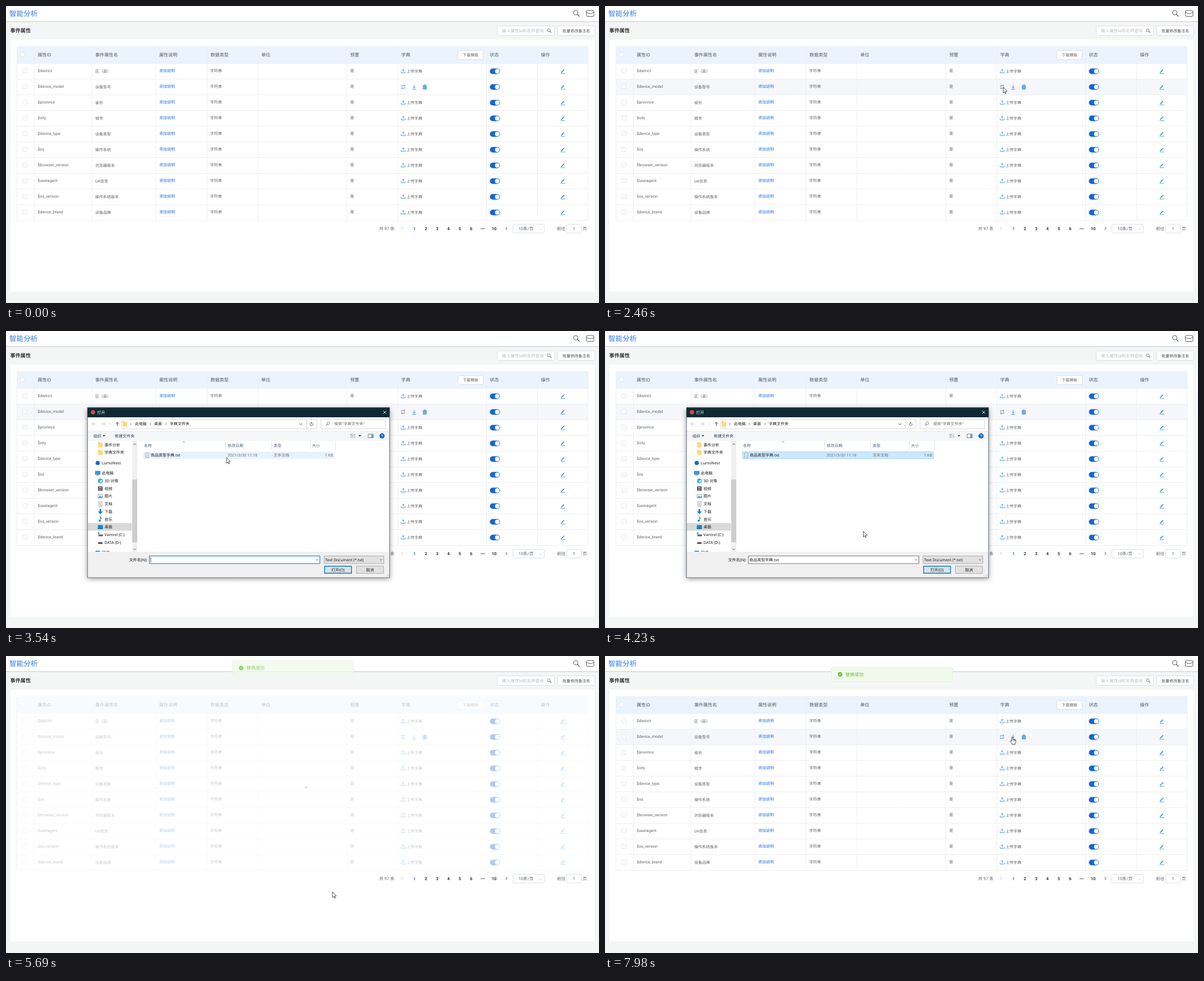
These frames come from a looping animation (1057x530 px, 8000 ms). An HTML page with a canvas:

```html
<!DOCTYPE html>
<html lang="zh-CN">
<head>
<meta charset="utf-8">
<title>事件属性</title>
<style>
html, body { margin: 0; width: 100%; height: 100%; overflow: hidden; background: #f4f6f6; }
canvas { display: block; }
</style>
</head>
<body>
<canvas id="stage" width="1057" height="530"></canvas>
<script>
const ctx = document.getElementById('stage').getContext('2d');
const LOOP = 8000, OPEN = 2700, CLICK = 1910, PICK = 3720, PRESS = 5100, CLOSE = 5380, DONE = 5560, RELOADED = 5760;
const CJK = '"Noto Sans CJK SC", "Noto Sans CJK", sans-serif';
const WEB = 'Roboto, ' + CJK, SYS = '"Noto Sans", ' + CJK;
const BLUE = '#3a8ee6', LINE = '#ebeef5', EDGE = '#dcdfe6', TEXT = '#606266';

// ---------- helpers ----------
const clamp = v => Math.max(0, Math.min(1, v));

// CSS "ease" timing: cubic-bezier(.25, .1, .25, 1)
function ease(p) {
  p = clamp(p);
  let lo = 0, hi = 1, s = p;
  for (let i = 0; i < 18; i++) {
    s = (lo + hi) / 2;
    const x = .75 * s * (1 - s) * (1 - s) + .75 * s * s * (1 - s) + s ** 3;
    if (x < p) lo = s; else hi = s;
  }
  return .3 * s * (1 - s) * (1 - s) + 3 * s * s * (1 - s) + s ** 3;
}

function text(s, x, y, size, color = TEXT, { font = WEB, weight = 400, align = 'left' } = {}) {
  ctx.font = `${weight} ${size}px ${font}`;
  ctx.textAlign = align;
  ctx.fillStyle = color;
  ctx.fillText(s, x, y + size * .37);
}
const sys = (s, x, y, color = '#1a1a1a', align = 'left') => text(s, x, y, 7, color, { font: SYS, align });

function rect(x, y, w, h, fill, stroke, r = 0, lw = 1) {
  ctx.beginPath();
  ctx.roundRect(x, y, w, h, r);
  if (fill) { ctx.fillStyle = fill; ctx.fill(); }
  if (stroke) { ctx.strokeStyle = stroke; ctx.lineWidth = lw; ctx.stroke(); }
}

function dot(x, y, r, fill, stroke, lw = 1) {
  ctx.beginPath();
  ctx.arc(x, y, r, 0, Math.PI * 2);
  if (fill) { ctx.fillStyle = fill; ctx.fill(); }
  if (stroke) { ctx.strokeStyle = stroke; ctx.lineWidth = lw; ctx.stroke(); }
}

function trace(pts) {
  ctx.beginPath();
  for (let i = 0; i < pts.length; i += 2) ctx.lineTo(pts[i], pts[i + 1]);
}
function line(color, w, ...pts) {
  trace(pts);
  ctx.strokeStyle = color;
  ctx.lineWidth = w;
  ctx.stroke();
}
function shape(color, ...pts) {
  trace(pts);
  ctx.fillStyle = color;
  ctx.fill();
}
const chevron = (x, y, color, s = 2, w = .8) => line(color, w, x - s, y - s / 2, x, y + s / 2, x + s, y - s / 2);

function lens(x, y, r, color, w, dir = 1) {
  dot(x, y, r, null, color, w);
  line(color, w * 1.3, x + dir * r * .7, y + r * .7, x + dir * r * 1.7, y + r * 1.7);
}

// ---------- pointer ----------
const PATH = [
  [80, 1015, 532], [400, 1005, 470], [680, 860, 400], [880, 745, 177], [1120, 712, 146],
  [1300, 706, 134], [1500, 708, 139], [2120, 708, 139], [2330, 710, 145], [3170, 710, 145],
  [3520, 400, 226], [3700, 363, 221], [4030, 363, 221], [4230, 460, 357], [4480, 578, 428],
  [4640, 582, 432], [4960, 582, 432], [5080, 582, 421], [6860, 582, 421], [7200, 640, 395],
  [7450, 715, 260], [7650, 729, 165], [7980, 726, 144]
];

function slope(i, k) {
  if (!i || i === PATH.length - 1) return 0;
  const [a, b, c] = PATH.slice(i - 1, i + 2);
  const d0 = (b[k] - a[k]) / (b[0] - a[0]), d1 = (c[k] - b[k]) / (c[0] - b[0]);
  return d0 * d1 <= 0 ? 0 : 2 * d0 * d1 / (d0 + d1);
}

// monotone cubic through the path points
function pointer(t) {
  const i = PATH.findIndex(p => p[0] > t) - 1;
  if (i < 0) return (t < PATH[0][0] ? PATH[0] : PATH[PATH.length - 1]).slice(1);
  const a = PATH[i], b = PATH[i + 1], dt = b[0] - a[0], u = (t - a[0]) / dt, v = 1 - u;
  return [1, 2].map(k =>
    (1 + 2 * u) * v * v * a[k] + u * v * v * dt * slope(i, k) +
    u * u * (3 - 2 * u) * b[k] - u * u * v * dt * slope(i + 1, k));
}

function hoveredRow(t) {
  if (t < 80) return -1;
  if (t >= OPEN && t < CLOSE) return 1;
  const [x, y] = pointer(t);
  return x > 20 && x < 1037 ? Math.floor((y - 102) / 28) : -1;
}

function drawPointer(t) {
  if (t < 80) return;
  const [x, y] = pointer(t);
  const hand = (t > 1250 && t < CLICK) || t > 7840;
  ctx.save();
  ctx.translate(x, y);
  ctx.lineJoin = 'round';
  ctx.beginPath();
  if (hand) {
    ctx.moveTo(-1, 8);
    ctx.lineTo(-1, 1);
    ctx.quadraticCurveTo(.1, -.8, 1.2, 1);
    ctx.lineTo(1.2, 5);
    ctx.quadraticCurveTo(2.5, 4, 3.2, 5.4);
    ctx.quadraticCurveTo(4.5, 4.6, 5, 6);
    ctx.quadraticCurveTo(6.4, 5.6, 6.4, 7.2);
    ctx.quadraticCurveTo(6.6, 10, 5, 12);
    ctx.lineTo(5, 13.6);
    ctx.lineTo(-.4, 13.6);
    ctx.lineTo(-.6, 12);
    ctx.lineTo(-3.8, 8);
    ctx.quadraticCurveTo(-3.2, 6.2, -1, 8);
  } else {
    for (const [px, py] of [[0, 0], [0, 10], [2.3, 8], [3.8, 11.4], [5.3, 10.7], [3.8, 7.4], [6.9, 7]]) ctx.lineTo(px, py);
  }
  ctx.closePath();
  ctx.fillStyle = '#fff';
  ctx.fill();
  ctx.strokeStyle = '#222';
  ctx.lineWidth = .8;
  ctx.stroke();
  if (hand) for (const fx of [1.2, 3.2, 5]) line('#222', .6, fx, 5.2, fx, 8);
  ctx.restore();
}

// ---------- page ----------
const COLS = [19.5, 50.5, 153, 267, 358.5, 449, 607.5, 698.5, 856.5, 947.5, 1037.5];
const HEADS = ['', '属性ID', '事件属性名', '属性说明', '数据类型', '单位', '预置', '字典', '状态', '操作'];
const ROWS = [
  ['$district', '区（县）'], ['$device_model', '设备型号'], ['$province', '省份'], ['$city', '城市'],
  ['$device_type', '设备类型'], ['$os', '操作系统'], ['$browser_version', '浏览器版本'],
  ['$useragent', 'UA信息'], ['$os_version', '操作系统版本'], ['$device_brand', '设备品牌']
];

function drawFrame() {
  rect(0, 0, 1057, 530, '#f4f6f6');
  rect(0, 28, 1057, 1, '#e6e8e8');
  rect(0, 0, 1057, 27, '#fff');
  rect(0, 27, 1057, 1, '#d6d8d8');
  text('智能分析', 6, 13, 12.6, '#6fa4e6', { weight: 700 });
  lens(1015.5, 12, 4, '#5c5c5c', 1);
  rect(1034.5, 8, 13.5, 10.5, null, '#5c5c5c', 2);
  ctx.beginPath();
  ctx.moveTo(1034.5, 11);
  ctx.quadraticCurveTo(1041.2, 16.5, 1048, 11);
  ctx.stroke();

  text('事件属性', 7.5, 43.5, 9.2, '#303133', { weight: 700 });
  rect(875.5, 35.5, 102, 17, '#fff', EDGE, 2);
  text('输入属性Id和名称查询', 884, 44, 7.6, '#b9bdc6');
  lens(967.5, 43.3, 2.6, TEXT, .8);
  rect(983.5, 35.5, 66, 17, '#fff', EDGE, 2);
  text('批量修改备注名', 1016.5, 44, 7, '#45484d', { align: 'center' });
  rect(8, 60, 1041, 449.5, '#fff');
}

function uploadIcon(x, y) {
  line(BLUE, .9, x - 3.6, y + .5, x - 3.6, y + 3, x + 3.6, y + 3, x + 3.6, y + .5);
  line(BLUE, .9, x, y + 1.2, x, y - 3.4);
  line(BLUE, .9, x - 2, y - 1.5, x, y - 3.6, x + 2, y - 1.5);
}

function dictIcons(y, busy) {
  const c = busy ? '#73767a' : BLUE;
  line(c, .9, 704.8, y - .6, 704.8, y - 2.4, 711, y - 2.4);
  line(c, .9, 709.4, y - 4, 711, y - 2.4, 709.4, y - .9);
  line(c, .9, 711, y + .4, 711, y + 2.2, 704.8, y + 2.2);
  line(c, .9, 706.4, y + .7, 704.8, y + 2.2, 706.4, y + 3.7);
  line(BLUE, .9, 727.5, y - 3.8, 727.5, y + 1.8);
  line(BLUE, .9, 725, y - .5, 727.5, y + 2, 730, y - .5);
  line(BLUE, 1, 723.8, y + 3.9, 731.2, y + 3.9);
  rect(743.6, y - 1.8, 5.8, 5.8, '#7db4ee', BLUE, .5, .9);
  line(BLUE, .9, 742.8, y - 2.5, 750.2, y - 2.5);
  line(BLUE, .9, 744.8, y - 3.8, 748.2, y - 3.8);
  line(BLUE, .7, 746.5, y - 1, 746.5, y + 3);
}

function drawTable(t) {
  rect(19.5, 72.5, 1018, 30, '#ebf4fd');
  const recent = Array.from({ length: 12 }, (_, k) => hoveredRow(t - k * 20));
  ROWS.forEach((row, i) => {
    const y = 102.5 + i * 28, mid = y + 13.5;
    const level = recent.filter(r => r === i).length / 12;
    if (level) rect(19.5, y, 1018, 28, `rgba(245,247,250,${level})`);
    line(LINE, 1, 19.5, y, 1037.5, y);
    rect(30, mid - 4, 7.5, 7.5, '#fff', EDGE, 1, .8);
    text(row[0], 56.5, mid - .5, 7);
    text(row[1], 159, mid + .5, 7);
    text('添加说明', 273, mid - .5, 7, '#1c6ddb');
    text('字符串', 364, mid - .5, 7);
    text('是', 613.5, mid - .5, 7);
    if (i === 1) dictIcons(mid + .5, t >= CLICK && t < DONE);
    else {
      uploadIcon(708, mid + .3);
      text('上传字典', 714, mid + .5, 7);
    }
    rect(862.5, mid - 4.5, 18, 10, '#1566d6', null, 5);
    dot(875.6, mid + .5, 4, '#fff');
    line(BLUE, 1.8, 990.5, mid + 2, 994.8, mid - 2.5);
    shape(BLUE, 989, mid + 3.5, 989.6, mid + 1.2, 991.4, mid + 2.8);
    line(BLUE, .8, 988.6, mid + 4.5, 996.8, mid + 4.5);
  });
  rect(19.5, 72.5, 1018, 310, null, LINE);
  for (const x of COLS.slice(1, -1)) line(LINE, 1, x, 72.5, x, 382.5);
  rect(25.5, 83, 7.5, 7.5, '#fff', EDGE, 1, .8);
  HEADS.forEach((h, i) => text(h, COLS[i] + 6, 87, 8.1, '#55585e'));
  rect(805.5, 79.5, 45, 16, '#fff', EDGE, 1.5);
  text('下载模板', 828, 87.5, 7, TEXT, { align: 'center' });
}

function drawPager() {
  const y = 397, mid = { align: 'center' }, bold = { align: 'center', weight: 700 };
  text('共 97 条', 665, y, 7.6);
  line('#b4b8c0', .9, 707, y - 2.5, 704.6, y, 707, y + 2.5);
  [1, 2, 3, 4, 5, 6].forEach(n => text(n, 708 + n * 20.2, y, 7.6, n === 1 ? '#2a6fdb' : '#303133', bold));
  for (const x of [847, 849.6, 852.2]) dot(x, y + .3, .85, '#303133');
  text('10', 870, y, 7.6, '#303133', bold);
  line('#303133', .9, 890.8, y - 2.5, 893.2, y, 890.8, y + 2.5);
  rect(903.5, 389.5, 56, 15.5, '#fff', EDGE, 2);
  text('10条/页', 927, y + .5, 7.6, TEXT, mid);
  chevron(953, y + 1, '#c0c4cc');
  text('前往', 982, y + .5, 7.6);
  rect(999.5, 389.5, 26, 15.5, '#fff', EDGE, 2);
  text('1', 1012.5, y + .5, 7.6, TEXT, mid);
  text('页', 1028, y + .5, 7.6);
}

function drawLoading(t) {
  if (t < DONE || t > RELOADED + 300) return;
  const shown = ease((Math.min(t, RELOADED) - DONE) / 300) * (1 - ease((t - RELOADED) / 300));
  ctx.globalAlpha = shown;
  rect(20, 72, 1018, 311, 'rgba(255,255,255,.9)');
  const a = .72 + (t - 5690) / 2000 * Math.PI * 2;
  ctx.beginPath();
  ctx.arc(528.5, 227, 9.8, a, a + .28 + clamp((t - 5690) / 600) * 1.5);
  ctx.strokeStyle = '#5b7488';
  ctx.lineWidth = 1.2;
  ctx.stroke();
  ctx.globalAlpha = 1;
}

function drawMessage(t) {
  if (t < DONE) return;
  ctx.save();
  ctx.globalAlpha = ease((t - DONE) / 300);
  ctx.translate(0, -26 * (1 - ease((t - DONE) / 400)));
  rect(403.5, 20, 216, 26, '#f0f9eb', '#e1f3d8', 2);
  dot(419, 32.8, 4, '#67c23a');
  line('#fff', .9, 417.2, 32.8, 418.6, 34.2, 421, 31.5);
  text('替换成功', 428.5, 32.8, 8.1, '#67c23a');
  ctx.restore();
}

// ---------- file dialog ----------
const folder = (x, y) => { rect(x - 4, y - 4.5, 4, 3, '#e8b84a'); rect(x - 4, y - 3.5, 8, 8, '#ffd97a'); };
const page = (x, y) => {
  rect(x - 3, y - 4.2, 6, 8.4, '#fff', '#8a8f94', 0, .7);
  for (let k = -2; k < 4; k += 1.6) line('#7fa3bd', .6, x - 1.8, y + k, x + 1.8, y + k);
};
const screen = (x, y) => { rect(x - 4.5, y - 3.5, 9, 6, '#2f9be6', '#5b7890', 0, .6); rect(x - 2.5, y + 3.2, 5, 1, '#5b7890'); };
const disk = (x, y) => { rect(x - 4, y, 8, 3, '#55595c'); rect(x - 3.4, y - .8, 6.8, 1, '#b8bcc0'); };
const NAV = [
  ['事件分析', 203, 1, folder],
  ['字典文件夹', 216.8, 1, folder],
  ['LumoNest', 235, 0, (x, y) => dot(x, y, 3.8, '#0a6fc2')],
  ['此电脑', 253, 0, screen],
  ['3D 对象', 267, 1, (x, y) => { shape('#27a5d8', x - 4, y - 2.5, x, y - 4.5, x + 4, y - 2.5, x + 4, y + 2.5, x, y + 4.5, x - 4, y + 2.5); shape('#b8e6f5', x - 1, y - 1, x + 3, y - 2, x + 3, y + 2, x - 1, y + 3); }],
  ['视频', 280.7, 1, (x, y) => { rect(x - 4, y - 4, 8, 8, '#454a50'); rect(x - 2.4, y - 3, 4.8, 2.6, '#7ab2dd'); rect(x - 2.4, y + .6, 4.8, 2.6, '#b58a5c'); }],
  ['图片', 294.4, 1, (x, y) => { rect(x - 4.2, y - 3.2, 8.4, 6.4, '#eaf5fc', '#7d8e9a', 0, .7); shape('#3b8fc9', x - 3.5, y + 2.5, x - .8, y - 1, x + 1, y + 1, x + 3.5, y, x + 3.5, y + 2.5); }],
  ['文档', 308, 1, page],
  ['下载', 321.8, 1, (x, y) => shape('#1b83d6', x - 1.6, y - 4.5, x + 1.6, y - 4.5, x + 1.6, y, x + 4.4, y, x, y + 4.6, x - 4.4, y, x - 1.6, y)],
  ['音乐', 335.5, 1, (x, y) => { dot(x - 1.3, y + 2.6, 1.8, '#1b83d6'); line('#1b83d6', 1.1, x, y + 2.5, x, y - 4, x + 2.6, y - 1); }],
  ['桌面', 349.2, 1, (x, y) => { rect(x - 4.5, y - 3.5, 9, 7, '#1487dc'); rect(x - 4.5, y + 2, 9, 1.5, '#0b5c9c'); }],
  ['Vantrel (C:)', 362.8, 1, (x, y) => { disk(x + .5, y); rect(x - 4.5, y - 3.8, 3, 3, '#27a5e0'); }],
  ['DATA (D:)', 376.5, 1, disk],
  ['网络', 394.5, 0, (x, y) => { rect(x - 4, y - 3, 8, 5, '#3b9be0'); dot(x + 3, y + 1, 2, '#55788f'); }]
];

function drawNav(shift) {
  ctx.save();
  ctx.beginPath();
  ctx.rect(146, 196, 89, 198);
  ctx.clip();
  rect(146, 342.3 + shift, 78.5, 13.4, '#d9d9d9');
  NAV.forEach(([label, y, depth, icon], i) => {
    const dy = y + (i > 1 ? shift : 0);
    icon(163.5 + depth * 4.7, dy);
    sys(label, 170.8 + depth * 4.8, dy);
  });
  rect(225, 196, 9, 198, '#f0f0f0');
  rect(225, 265, 9, 112, '#cdcdcd');
  line('#505050', 1, 227.3, 203, 229.5, 200.8, 231.7, 203);
  line('#505050', 1, 227.3, 388.3, 229.5, 390.5, 231.7, 388.3);
  ctx.restore();
}

function drawFiles(t, ready, pressed, shift) {
  const head = '#4c607a', gray = '#6d6d6d', y = 221.2 + shift;
  [['名称', 246], ['修改日期', 395], ['类型', 477], ['大小', 545.5]].forEach(([s, x]) => sys(s, x, 204.3, head));
  for (const x of [391.5, 473.5, 542.5, 587.5]) line('#e5e5e5', 1, x, 197, x, 212);
  line('#6d6d6d', .8, 315, 198.8, 317.2, 196.8, 319.4, 198.8);
  const [px, py] = pointer(t);
  const over = px > 245 && px < 586 && py > 215 && py < 228;
  if (pressed) rect(244.5, 215.5, 341, 12.5, '#d9d9d9');
  else if (t >= PICK) rect(245, 215.5, 340.5, 12.5, '#cce8ff', '#99d1ff', 0, .8);
  else if (over) rect(244.5, 215.5, 341, 12.5, '#e5f3ff');
  page(251.5, y);
  sys('商品类型字典.txt', 258, y);
  sys('2021/3/30 11:18', 395, y, gray);
  sys('文本文档', 477, y, gray);
  sys('1 KB', 583, y, gray, 'right');
}

function drawFooter(t, pressed) {
  rect(145.5, 394, 538, 46, '#f0f0f0');
  sys('文件名(N):', 252, 408, '#1a1a1a', 'right');
  const picked = t >= PICK;
  rect(255.5, 401.5, 304, 13.5, '#fff', picked && !pressed ? '#7a7a7a' : '#0078d7');
  chevron(554.5, 408.3, '#444');
  if (pressed) rect(257, 403, 52, 10.5, '#0078d7');
  if (picked) sys('商品类型字典.txt', 257.3, 408.3, pressed ? '#fff' : '#1a1a1a');
  else line('#1a1a1a', .8, 258, 403.5, 258, 413);
  rect(567, 401.5, 106.5, 13.5, '#e1e1e1', '#adadad');
  text('Text Document (*.txt)', 569, 408, 6.85, '#1a1a1a', { font: SYS });
  chevron(668.5, 408.3, '#444');

  const [px, py] = pointer(t);
  const over = px > 567 && px < 616 && py > 419 && py < 433;
  if (pressed) rect(567.5, 419.5, 48.5, 13, '#cce4f7', '#005499');
  else rect(568, 419.8, 47.8, 12.4, over ? '#e5f1fb' : '#e1e1e1', '#0078d7', 0, over ? 1 : 1.4);
  sys('打开(O)', 591.8, 426, '#1a1a1a', 'center');
  rect(624.5, 419.5, 48.5, 13, '#e1e1e1', '#adadad');
  sys('取消', 648.8, 426, '#1a1a1a', 'center');
  for (const [x, y] of [[681.5, 437.5], [679, 437.5], [681.5, 435]]) rect(x - .6, y - .6, 1.2, 1.2, '#b0b0b0');
}

function drawAddress() {
  const faint = '#c4c4c4', dark = '#444';
  line(faint, 1, 160, 166, 153, 166);
  line(faint, 1, 155.8, 163, 153, 166, 155.8, 169);
  line(faint, 1, 169.5, 166, 176.5, 166);
  line(faint, 1, 173.7, 163, 176.5, 166, 173.7, 169);
  chevron(186.5, 166, faint, 1.4);
  line(dark, 1, 198.3, 169.5, 198.3, 163);
  line(dark, 1, 195.5, 165.6, 198.3, 162.8, 201.1, 165.6);
  rect(206.5, 157.5, 348, 17, '#fff', '#d9d9d9');
  line('#d9d9d9', 1, 535.5, 157.5, 535.5, 174.5);
  folder(212, 166);
  for (const x of [222.5, 257.3, 285.3]) line(dark, .8, x - .8, 164.2, x + .8, 166, x - .8, 167.8);
  sys('此电脑', 229.8, 165.8);
  sys('桌面', 264, 165.8);
  sys('字典文件夹', 292, 165.8);
  chevron(525.5, 166.2, dark, 2.4, 1);
  ctx.beginPath();
  ctx.arc(545, 166.2, 2.4, -.6, 4.4);
  ctx.strokeStyle = dark;
  ctx.lineWidth = .9;
  ctx.stroke();
  shape(dark, 543.8, 162.4, 546.4, 163.7, 544.2, 165.3);
  rect(561.5, 157.5, 115, 17, '#fff', '#d9d9d9');
  lens(574.5, 164.7, 2.4, '#6d6d6d', .8, -1);
  sys('搜索"字典文件夹"', 585, 165.8, '#6d6d6d');
}

function drawToolbar(ready) {
  rect(145.5, 179, 538, 17, '#f5f6f7');
  line('#e4e8ec', 1, 145.5, 179.5, 683.5, 179.5);
  if (ready) {
    const ink = '#1e395b';
    sys('组织', 155.8, 187.5, ink);
    shape(ink, 172.2, 186, 177, 186, 174.6, 188.6);
    sys('新建文件夹', 194, 187.5, ink);
    for (const y of [184.5, 187.2, 189.9]) {
      for (const x of [614, 616.5]) rect(x, y - .7, 1.5, 1.4, '#7a8c9c');
      line('#8b98a4', .8, 619, y, 623, y);
    }
    shape(ink, 628.4, 186, 633.2, 186, 630.8, 188.6);
  }
  rect(645.5, 184, 9, 6.5, '#fff', '#5d6f80', 0, .9);
  rect(651, 184.5, 3, 5.5, '#6ea9dc');
  dot(670.3, 187.2, 4.6, '#0b66c3');
  text('?', 670.3, 187.2, 7, '#fff', { font: SYS, weight: 700, align: 'center' });
}

function drawDialog(t) {
  if (t < OPEN || t >= CLOSE) return;
  const ready = t >= 2840, pressed = t >= PRESS, shift = ready ? .5 : 0;
  ctx.save();
  ctx.globalAlpha = Math.min(clamp((t - OPEN + 20) / 80), clamp((CLOSE - t) / 90));
  ctx.shadowColor = 'rgba(0,0,0,.4)';
  ctx.shadowBlur = 9;
  ctx.shadowOffsetY = 2;
  rect(145, 136.5, 539, 304, '#fff');
  ctx.shadowColor = 'transparent';
  rect(145, 136.5, 539, 17.5, '#0f2a35');
  dot(155, 145, 3.8, '#db4a3c');
  sys('打开', 162.5, 145.3, '#fff');
  line('#fff', .9, 672.4, 142.4, 677.6, 147.6);
  line('#fff', .9, 677.6, 142.4, 672.4, 147.6);
  drawAddress();
  drawToolbar(ready);
  drawNav(shift);
  drawFiles(t, ready, pressed, shift);
  drawFooter(t, pressed);
  rect(145.3, 136.8, 538.4, 303.4, null, '#3c525b', 0, .8);
  ctx.restore();
}

// ---------- loop ----------
function draw(t) {
  ctx.textRendering = 'geometricPrecision';
  drawFrame();
  drawTable(t);
  drawPager();
  drawLoading(t);
  drawMessage(t);
  drawDialog(t);
  drawPointer(t);
}

const start = performance.now();
function tick() {
  draw((performance.now() - start) % LOOP);
  requestAnimationFrame(tick);
}
tick();
</script>
</body>
</html>
```
